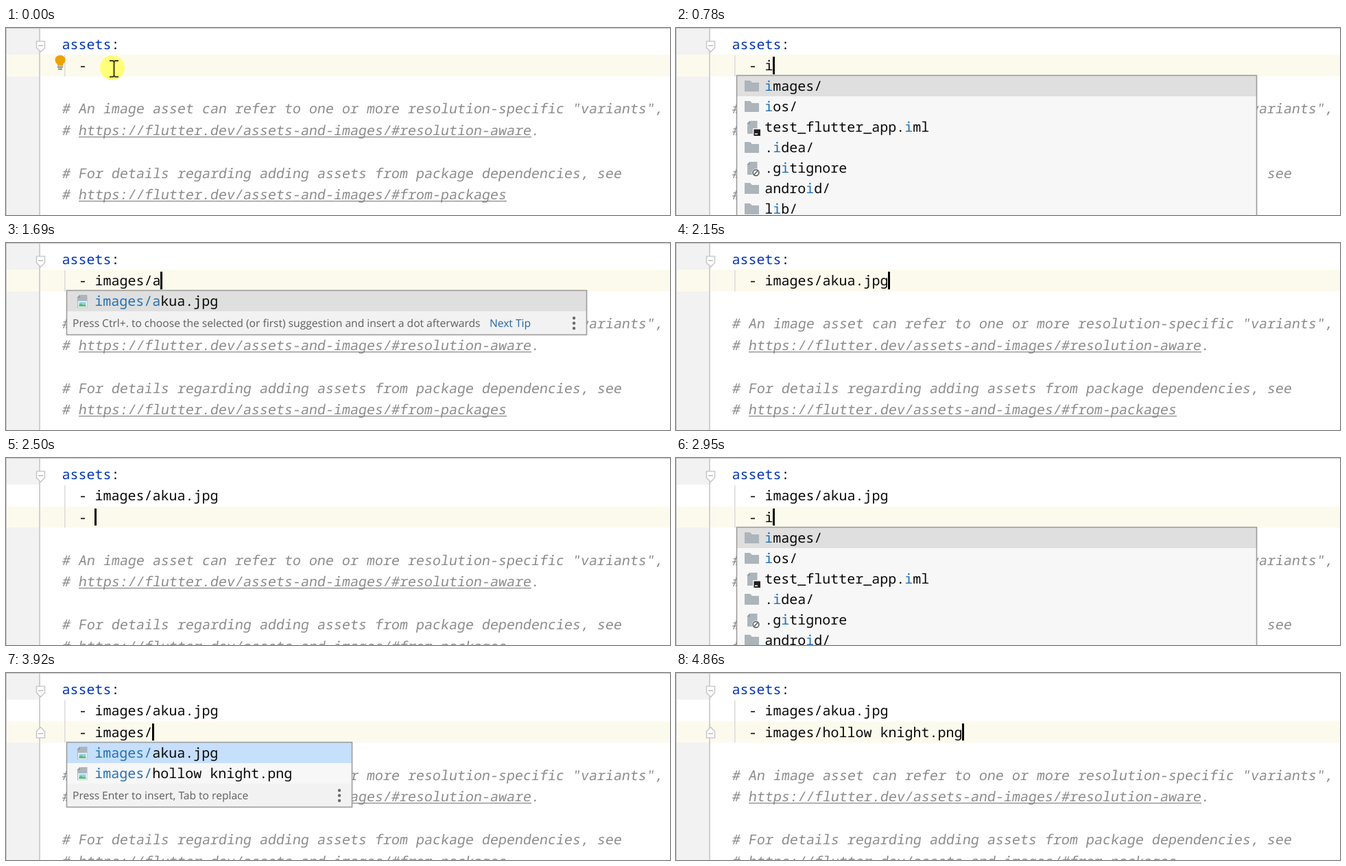
An HTML page that plays this animation: 968x274 px, repeating every 5.36 s.

```html
<!DOCTYPE html>
<html lang="en">
<head>
<meta charset="utf-8">
<title>Asset path completion</title>
<style>
  html, body { margin: 0; width: 100%; height: 100%; overflow: hidden; background: #fff; }
  svg { display: block; width: 968px; height: 274px; }
  text { font: 20px "Noto Sans Mono", "DejaVu Sans Mono", monospace; fill: #080808;
         text-rendering: geometricPrecision; font-variant-ligatures: none; }
  .key { fill: #0033b3; }
  .note { fill: #8c8c8c; }
  .match { fill: #2470b3; }
  .hint { font: 500 15.6px "Open Sans", "Noto Sans", sans-serif; fill: #5e5e5e; }
  .link { fill: #2464ae; }
</style>
</head>
<body>
<svg id="stage" viewBox="0 0 968 274"></svg>
<script>
const LOOP = 5360, CHAR = 12, LINE = 31.5, ROW = 30;
const stage = document.getElementById('stage');

const rect = (x, y, w, h, fill, more = '') =>
  `<rect x="${x}" y="${y}" width="${w}" height="${h}" fill="${fill}" ${more}/>`;
const path = (d, fill, more = '') => `<path d="${d}" fill="${fill}" ${more}/>`;
const dot = (x, y, r, fill, more = '') => `<circle cx="${x}" cy="${y}" r="${r}" fill="${fill}" ${more}/>`;
const text = (x, y, s, cls = '') => `<text x="${x}" y="${y}" class="${cls}">${s}</text>`;
const at = (x, y, s) => `<g transform="translate(${x} ${y})">${s}</g>`;
const baseline = n => Math.floor(31 + n * LINE);

const FILES = [
  ['dir', 'images/'], ['dir', 'ios/'], ['iml', 'test_flutter_app.iml'], ['dir', '.idea/'],
  ['git', '.gitignore'], ['dir', 'android/'], ['dir', 'lib/']
];
const PICS = [['pic', 'images/akua.jpg'], ['pic', 'images/hollow knight.png']];
const DOT_TIP = 'Press Ctrl+. to choose the selected (or first) suggestion and insert a dot afterwards';
const TAB_TIP = 'Press Enter to insert, Tab to replace';

const all = { items: FILES, match: 'i' };
const two = { items: [FILES[0], FILES[2]], match: 'im', tip: DOT_TIP, link: 705 };
const one = { items: [FILES[0]], match: 'ima', tip: DOT_TIP, link: 705 };
const akua = { items: [PICS[0]], match: 'images/a', tip: DOT_TIP, link: 705 };
const twoTab = { ...two, tip: TAB_TIP, link: 363 };
const oneTab = { ...one, tip: TAB_TIP, link: 363 };
const pics = { items: PICS, match: 'images/', tip: TAB_TIP, right: 505, tint: '#c5dffc' };
const second = { ...pics, pick: 1 };

// [start ms, line, typed text, popup, extras]
const STEPS = [
  [0, 0, '', null, 'mouse bulb'],
  [50, 0, '', null, 'bulb'],
  [130, 0, ''],
  [730, 0, 'i'],
  [780, 0, 'i', all],
  [930, 0, 'im', all],
  [960, 0, 'im', two],
  [1110, 0, 'ima', one],
  [1360, 0, 'images/'],
  [1640, 0, 'images/a'],
  [1690, 0, 'images/a', akua],
  [2150, 0, 'images/akua.jpg'],
  [2500, 1, ''],
  [2900, 1, 'i'],
  [2950, 1, 'i', all],
  [3100, 1, 'im', all],
  [3150, 1, 'im', twoTab],
  [3280, 1, 'ima', oneTab],
  [3560, 1, 'images/'],
  [3870, 1, 'images/', null, 'fold'],
  [3920, 1, 'images/', pics, 'fold'],
  [4380, 1, 'images/', pics, 'fold bulb'],
  [4580, 1, 'images/', second, 'fold bulb'],
  [4630, 1, 'images/', second, 'fold'],
  [4860, 1, 'images/hollow knight.png', null, 'fold']
];

function icon(kind) {
  const gray = '#abb5bb';
  if (kind === 'dir') return path('M100 -8H108L111 -5H121V8H100Z', gray);
  const page = path('M109 -9H118.5V10H104V-4Z', gray) + path('M103 -4.5L108 -9.5V-4.5Z', '#8f9ca4');
  if (kind === 'iml')
    return page + rect(112, 2, 11.5, 11, '#f7f7f7') + rect(113.5, 3.5, 9.5, 9.5, '#231f20') +
      rect(115, 9.5, 4, 1.5, '#fff');
  if (kind === 'git')
    return page + dot(116.5, 7, 6, '#f7f7f7') +
      dot(116.5, 7, 4.4, 'none', 'stroke="#5d6468" stroke-width="1.6"') +
      path('M113.5 10L119.5 4', 'none', 'stroke="#5d6468" stroke-width="1.6"');
  return page + rect(105, 0, 13, 9.5, '#eef5f8') + rect(106.5, 1.5, 10, 6.5, '#8fd0ea') +
    path('M106.5 8V5.5L109.5 3.5L112.5 6L114 5L116.5 6.5V8Z', '#62b873');
}

function foldMark(y, up) {
  const d = up ? 'M44.5 7.5V-2L50.5 -8L56.5 -2V7.5Z' : 'M44.5 -7.5V2L50.5 8L56.5 2V-7.5Z';
  return at(0, y, path(d, '#fff', 'stroke="#c9c9c9" stroke-width="1.6"') +
    rect(47, up ? 0.5 : -2, 7, 1.5, '#bcbcbc'));
}

function bulb(y) {
  return at(79, y, path('M-4 8V5.5C-10 1 -8 -7.5 0 -7.5S10 1 4 5.5V8Z', '#eda200') +
    rect(-4, 9, 8, 1.6, '#6e6e6e') + rect(-3, 12, 6, 1.6, '#6e6e6e'));
}

function mouse() {
  return dot(155, 58, 18, '#ffff78') +
    path('M151 48H156L157.5 49.5L159 48H164M157.5 49V71M151 71.5H156L157.5 70L159 71.5H164', 'none',
      'stroke="#3c3c1c" stroke-width="2"');
}

function comment(n, words, isLink) {
  const y = baseline(n);
  const width = words.replace(/\.$/, '').length * CHAR;
  const slant = (x, s) => `<g transform="translate(${x} ${y}) skewX(-9)">${text(0, 0, s, 'note')}</g>`;
  return slant(81, '#') + slant(105, words) + (isLink ? rect(106, y + 2, width, 1.3, '#8c8c8c') : '');
}

function popup(line, { items, match, tip, link, right = 847, tint = '#dfdfdf', pick = 0 }) {
  const top = 69 + line * 32, width = right - 88;
  const height = 1 + items.length * ROW + (tip ? 35 : 40);
  let s = rect(88.5, top + 0.5, width - 1, height - 1, '#f7f7f7');
  s += rect(89, top + 1 + pick * ROW, width - 2, ROW, tint);
  items.forEach(([kind, name], i) => {
    const y = top + 16 + i * ROW, k = name.indexOf(match);
    const label = name.slice(0, k) + `<tspan class="match">${match}</tspan>` + name.slice(k + match.length);
    s += at(0, y, icon(kind)) + text(129.3, y + 7, label);
  });
  if (tip) {
    const y = top + 1 + items.length * ROW;
    s += rect(89, y, width - 2, 34, '#f2f2f2') + text(97, y + 23, tip, 'hint');
    if (link) s += text(link, y + 23, 'Next Tip', 'hint link');
    for (const dy of [10, 17.5, 25]) s += dot(right - 19, y + dy, 2.2, '#6a6a6a');
  }
  return s + rect(88.5, top + 0.5, width - 1, height - 1, 'none', 'stroke="#9c9c9c" stroke-width="1.6"');
}

function render([, line, typed, list, extras = '']) {
  const has = name => extras.includes(name);
  const rowTop = line ? 71 : 39, rowHeight = line ? 31 : 32;
  let s = rect(0, 0, 968, 274, '#fff') + rect(0, 0, 49, 274, '#f2f2f2');
  if (line) s += rect(0, 39, 49, 32, '#fff');
  s += rect(0, rowTop, 968, rowHeight, '#fcfaed');
  s += rect(48, 0, 2, 274, '#d0d0d0') + rect(0, 0, 968, 1, '#c6c6c6') + rect(0, 0, 1, 274, '#c6c6c6');
  s += rect(85, 40, 1.6, line ? 62 : 31, '#dcdcdc');
  s += foldMark(27, false);
  if (has('fold')) s += foldMark(87.5, true);

  const entry = (n, name) => text(106, baseline(n), '-') + text(129.5, baseline(n), name);
  s += text(81.5, baseline(0), '<tspan class="key">assets</tspan>:');
  if (line) s += entry(1, 'images/akua.jpg');
  s += entry(line + 1, typed);

  s += comment(line + 3, 'An image asset can refer to one or more resolution-specific "variants",');
  s += comment(line + 4, 'https://flutter.dev/assets-and-images/#resolution-aware.', true);
  s += comment(line + 6, 'For details regarding adding assets from package dependencies, see');
  s += comment(line + 7, 'https://flutter.dev/assets-and-images/#from-packages', true);

  if (has('bulb')) s += bulb(line ? 79 : 47.5);
  if (has('mouse')) s += mouse();
  else s += rect(129 + typed.length * CHAR, rowTop + 3, 3, rowHeight - 6, '#000');
  if (list) s += popup(line, list);
  stage.innerHTML = s;
}

const start = performance.now();
let shown;
function tick() {
  const t = (performance.now() - start) % LOOP;
  const step = STEPS.filter(([from]) => from <= t).pop();
  if (step !== shown) render(shown = step);
  requestAnimationFrame(tick);
}
tick();
</script>
</body>
</html>
```
